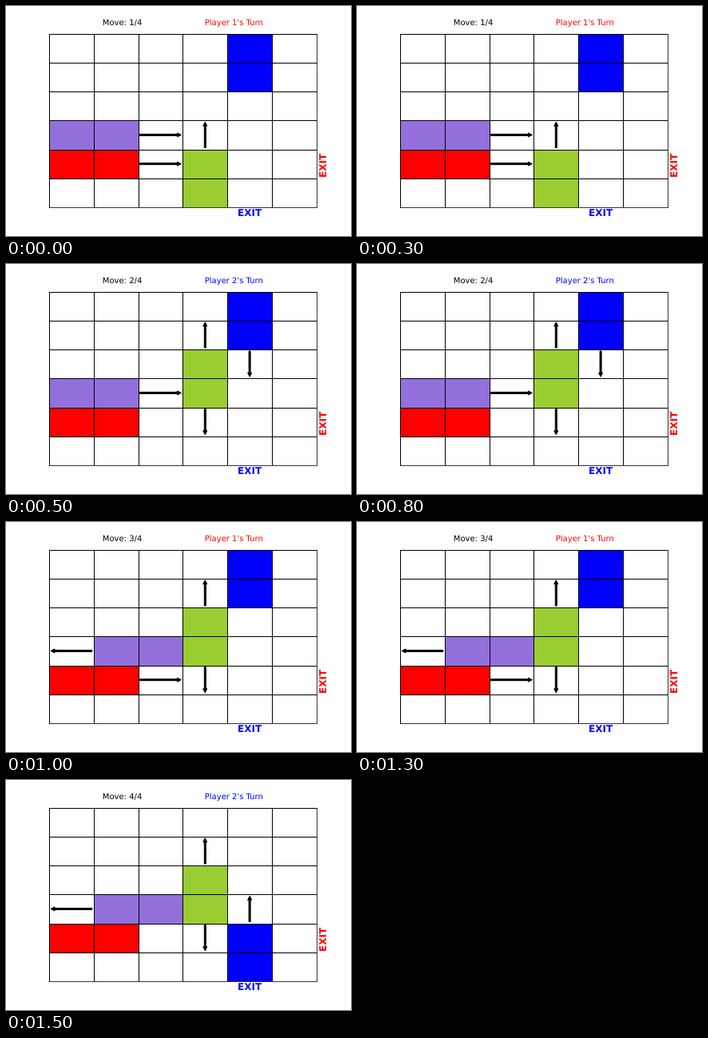
Write an HTML page with a canvas that moves like this. It is 432 px wide and 288 px high and loops after 2000 ms.

```html
<!DOCTYPE html>
<html lang="en">
<head>
<meta charset="utf-8">
<title>Sliding blocks</title>
<style>
html, body { margin: 0; width: 100%; height: 100%; overflow: hidden; background: #fff; }
canvas { display: block; }
</style>
</head>
<body>
<canvas id="stage" width="432" height="288"></canvas>
<script>
const ctx = document.getElementById("stage").getContext("2d");
const STEP = 500;
const CELLS = 6;
const LEFT = 54, TOP = 34.56, CELL_W = 55.8, CELL_H = 36.24;
const RED = "#ff0000", BLUE = "#0000ff", PURPLE = "#9370db", GREEN = "#9acd32";
const DIRECTIONS = { right: 0, down: Math.PI / 2, left: Math.PI, up: -Math.PI / 2 };

// Pixel index of each grid line
const gridX = i => Math.round(LEFT + i * CELL_W);
const gridY = i => Math.round(TOP + i * CELL_H);

// Blocks: [colour, column, row, width, height]; arrows: [column, row, direction]
const redBlock = [RED, 0, 4, 2, 1];
const purpleLeft = [PURPLE, 0, 3, 2, 1];
const purpleRight = [PURPLE, 1, 3, 2, 1];
const greenLow = [GREEN, 3, 4, 1, 2];
const greenHigh = [GREEN, 3, 2, 1, 2];
const blueTop = [BLUE, 4, 0, 1, 2];
const blueBottom = [BLUE, 4, 4, 1, 2];
const greenMoves = [[3, 1, "up"], [3, 4, "down"]];

const moves = [
  {
    blocks: [redBlock, purpleLeft, greenLow, blueTop],
    arrows: [[2, 3, "right"], [2, 4, "right"], [3, 3, "up"]]
  },
  {
    blocks: [redBlock, purpleLeft, greenHigh, blueTop],
    arrows: [[2, 3, "right"], ...greenMoves, [4, 2, "down"]]
  },
  {
    blocks: [redBlock, purpleRight, greenHigh, blueTop],
    arrows: [[0, 3, "left"], [2, 4, "right"], ...greenMoves]
  },
  {
    blocks: [redBlock, purpleRight, greenHigh, blueBottom],
    arrows: [[0, 3, "left"], ...greenMoves, [4, 3, "up"]]
  }
];

function drawBlock([color, col, row, w, h]) {
  const x = gridX(col), y = gridY(row);
  ctx.fillStyle = color;
  ctx.fillRect(x, y, gridX(col + w) - x, gridY(row + h) - y);
}

function drawGrid() {
  const left = gridX(0), top = gridY(0);
  const width = gridX(CELLS) - left + 1, height = gridY(CELLS) - top + 1;
  // The right and bottom edges are slightly lighter
  for (let i = CELLS; i >= 0; i--) {
    ctx.fillStyle = i === CELLS ? "#333" : "#000";
    ctx.fillRect(gridX(i), top, 1, height);
    ctx.fillRect(left, gridY(i), width, 1);
  }
  ctx.fillStyle = "#333";
  ctx.fillRect(gridX(CELLS), top + 1, 1, height - 1);
  ctx.fillRect(left + 1, gridY(CELLS), width - 1, 1);
}

function drawArrow([col, row, direction]) {
  const horizontal = direction === "left" || direction === "right";
  const half = (horizontal ? CELL_W : CELL_H) / 2 - 2;
  const neck = half - 5;
  ctx.save();
  ctx.translate(LEFT + (col + 0.5) * CELL_W, TOP + (row + 0.5) * CELL_H);
  ctx.rotate(DIRECTIONS[direction]);
  ctx.fillStyle = ctx.strokeStyle = "#000";
  ctx.lineWidth = 1;
  ctx.beginPath();
  ctx.moveTo(-half, -1);
  ctx.lineTo(neck, -1);
  ctx.lineTo(neck, -2.5);
  ctx.lineTo(half, 0);
  ctx.lineTo(neck, 2.5);
  ctx.lineTo(neck, 1);
  ctx.lineTo(-half, 1);
  ctx.closePath();
  ctx.fill();
  ctx.stroke();
  ctx.restore();
}

function drawText(text, x, y, color, font = "10px") {
  ctx.font = `${font} "DejaVu Sans", sans-serif`;
  ctx.textRendering = "geometricPrecision";
  ctx.fillStyle = color;
  ctx.fillText(text, x, y);
}

function drawExits() {
  drawText("EXIT", 290, 263, BLUE, "bold 12px");
  ctx.save();
  ctx.translate(401, 215);
  ctx.rotate(-Math.PI / 2);
  drawText("EXIT", 0, 0, RED, "bold 12px");
  ctx.restore();
}

function draw(index) {
  const { blocks, arrows } = moves[index];
  const player = index % 2 + 1;
  ctx.fillStyle = "#fff";
  ctx.fillRect(0, 0, 432, 288);
  blocks.forEach(drawBlock);
  drawGrid();
  arrows.forEach(drawArrow);
  drawText(`Move: ${index + 1}/${moves.length}`, 120.8, 24, "#000");
  drawText(`Player ${player}'s Turn`, 248.8, 24, player === 1 ? RED : BLUE);
  drawExits();
}

const start = performance.now();

function tick() {
  const elapsed = performance.now() - start;
  draw(Math.floor(elapsed / STEP) % moves.length);
  requestAnimationFrame(tick);
}

tick();
</script>
</body>
</html>
```
